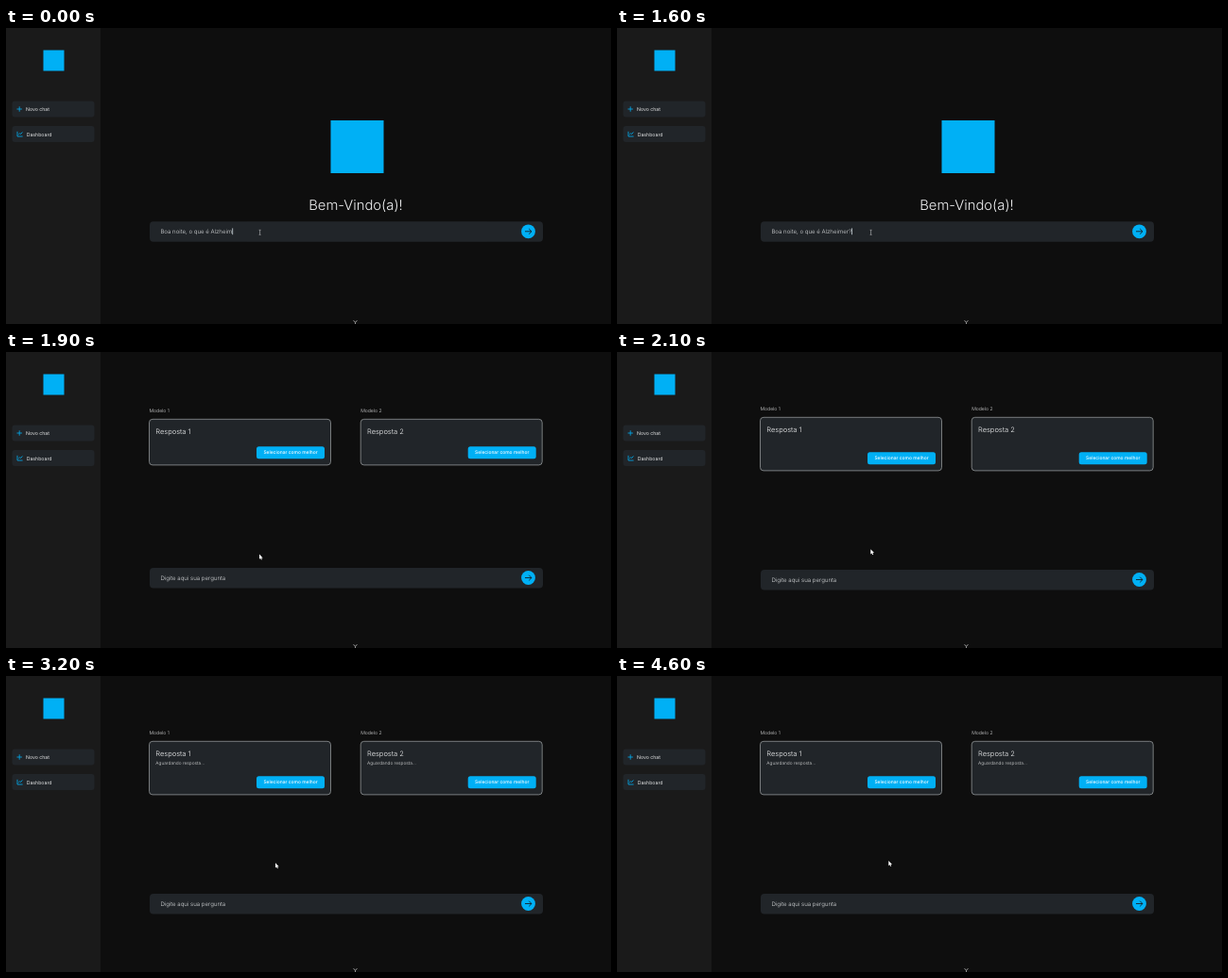
These frames come from a looping animation (640 by 314 pixels, 5000 ms). An HTML page:

```html
<!DOCTYPE html>
<html lang="pt-BR">
<head>
<meta charset="utf-8">
<title>Chat</title>
<style>
html, body { margin: 0; width: 100%; height: 100%; overflow: hidden; background: #0e0e0e; }
svg { display: block; width: 640px; height: 314px; }
text { font-family: Inter, sans-serif; font-weight: 300; fill: #f1f2f3; text-rendering: geometricPrecision; white-space: pre; }
.panel { fill: #212529; }
.blue { fill: #00b0f5; }
.card { fill: #212529; stroke: #a3a6a8; stroke-width: .7; }
.line { fill: none; stroke: #00b0f5; stroke-width: .8; }
.side { font-size: 5.2px; font-weight: 400; fill: #e4e5e6; }
.label { font-size: 5.1px; fill: #dcddde; }
.head { font-size: 7.5px; }
.wait { font-size: 4.8px; fill: #dcddde; }
.pick { font-size: 4.95px; font-weight: 500; fill: #fff; text-anchor: middle; }
.field { font-size: 6.1px; fill: #dddfe1; }
.title { font-size: 14.8px; text-anchor: middle; }
</style>
</head>
<body>
<svg viewBox="0 0 640 314">
  <defs>
    <g id="bar">
      <rect class="panel" x="152" width="416" height="21.5" rx="4"/>
      <circle class="blue" cx="552.5" cy="10.5" r="7.4"/>
      <path d="M549 10.5h7M553.2 7.7l2.8 2.8-2.8 2.8" fill="none" stroke="#14222b" stroke-width=".9"/>
    </g>
  </defs>
  <rect width="640" height="314" fill="#0e0e0e"/>
  <rect width="100" height="314" fill="#1a1a1a"/>
  <rect class="blue" x="39.5" y="23.5" width="22" height="22"/>
  <rect class="panel" x="6.5" y="77.5" width="87" height="17" rx="3"/>
  <path class="line" d="M11.5 86h5.4M14.2 83.3v5.4"/>
  <text class="side" x="21" y="87.9">Novo chat</text>
  <rect class="panel" x="6.5" y="104" width="87" height="17" rx="3"/>
  <path class="line" d="M12 109.8v5.2h5.6M13.3 113.2l1.4-1.6 1 .9 1.7-2.1"/>
  <text class="side" x="21.7" y="114.5">Dashboard</text>
  <path d="M367.6 310.2l1.9 2.2 1.9-2.2M369.5 312.4v1.6" fill="none" stroke="#aaa" stroke-width=".9"/>

  <g id="welcome">
    <rect class="blue" x="343.5" y="98" width="56" height="56"/>
    <text class="title" x="370" y="193.4">Bem-Vindo(a)!</text>
    <use href="#bar" y="205.3"/>
    <text class="field" id="typed" x="163.4" y="218"></text>
    <rect id="caret" y="212.4" width=".7" height="6.8" fill="#e8f4fa"/>
    <path d="M267.6 214.3h2M268.6 214.3v5M267.6 219.3h2" fill="none" stroke="#b9bbbd" stroke-width=".6"/>
  </g>

  <g id="chat">
    <g id="cards"></g>
    <g id="ask">
      <use href="#bar"/>
      <text class="field" x="163.4" y="12.7">Digite aqui sua pergunta</text>
    </g>
    <path id="mouse" d="M0 0v5.2l1.2-1 .8 1.8.9-.4-.8-1.7h1.6z" fill="#fff"/>
  </g>
</svg>
<script>
const LOOP = 5000, STEP = 100;
const ANSWER = 1800, GROW = 2100, WAIT = 2200;
const PROMPT = "Boa noite, o que é Alzheimer?";
// time, x, y of the pointer tip
const PATH = [
  [1800, 268, 216.5], [1900, 268, 214.5], [2100, 268.3, 209.2], [2400, 275.8, 202.4],
  [2600, 281.5, 200], [2800, 285, 198.3], [3400, 285, 198.3], [3500, 285, 198],
  [3700, 285, 198], [3800, 287, 197.6], [4500, 287, 197.6], [4600, 287.3, 196]
];
const $ = id => document.getElementById(id);

const card = n => `<g transform="translate(${(n - 1) * 223.7})">
  <text class="label" x="151.5" y="62" data-top>Modelo ${n}</text>
  <rect class="card" x="151.5" width="192" rx="3.5"/>
  <text class="head" x="158.3" y="85" data-top>Resposta ${n}</text>
  <text class="wait" x="158.3" y="94">Aguardando resposta...</text>
  <g class="action">
    <rect class="blue" x="265" width="72" height="13" rx="2.5"/>
    <text class="pick" x="301" y="8.3">Selecionar como melhor</text>
  </g>
</g>`;
$("cards").innerHTML = card(1) + card(2);

const each = (selector, fn) => document.querySelectorAll(selector).forEach(fn);
const show = (el, on) => el.setAttribute("visibility", on ? "inherit" : "hidden");
const move = (el, x, y) => el.setAttribute("transform", `translate(${x} ${y})`);

function pointer(t) {
  let i = 0;
  while (i < PATH.length - 1 && PATH[i + 1][0] <= t) i++;
  const a = PATH[i], b = PATH[i + 1] || a;
  const k = b === a ? 0 : Math.max(0, (t - a[0]) / (b[0] - a[0]));
  return [a[1] + (b[1] - a[1]) * k, a[2] + (b[2] - a[2]) * k];
}

function drawWelcome(t) {
  const missing = Math.max(0, 3 - Math.floor(t / STEP));
  const typed = $("typed");
  typed.textContent = PROMPT.slice(0, PROMPT.length - missing);
  $("caret").setAttribute("x", 163.6 + typed.getComputedTextLength());
}

function drawChat(t) {
  const grown = t >= GROW;
  const top = grown ? 69.3 : 71.3;
  each("[data-top]", el => move(el, 0, grown ? 0 : 2));
  each(".card", el => {
    el.setAttribute("y", top);
    el.setAttribute("height", grown ? 56.6 : 48.6);
  });
  each(".wait", el => show(el, t >= WAIT));
  each(".action", el => move(el, 0, grown ? 106.2 : 100.2));
  move($("ask"), 0, grown ? 231 : 229);
  move($("mouse"), ...pointer(t));
}

function draw(time) {
  const t = Math.floor((time % LOOP) / STEP) * STEP;
  const chat = t >= ANSWER;
  show($("welcome"), !chat);
  show($("chat"), chat);
  chat ? drawChat(t) : drawWelcome(t);
}

const start = performance.now();
function tick() {
  draw(performance.now() - start);
  requestAnimationFrame(tick);
}
tick();
</script>
</body>
</html>
```
